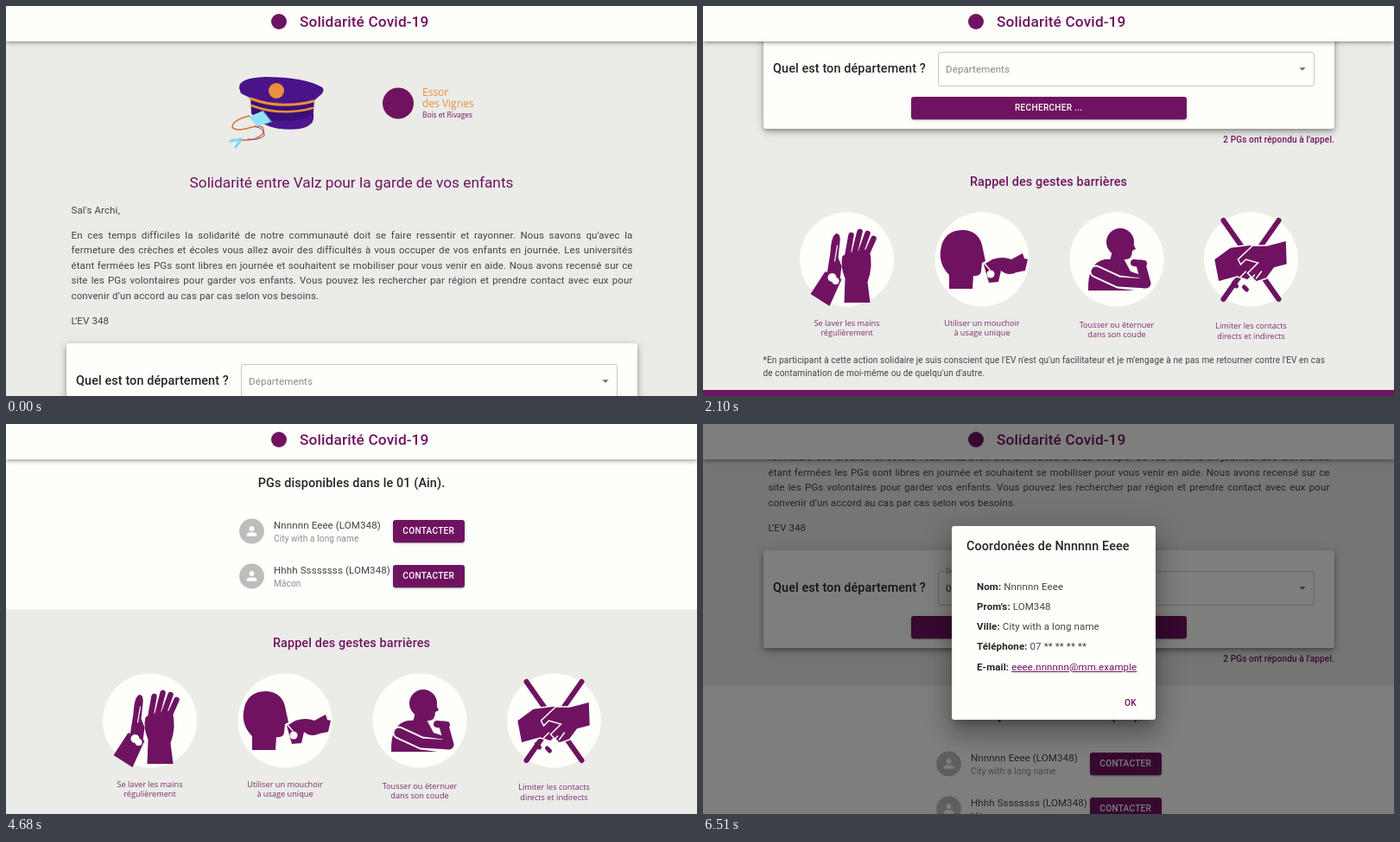
Animation, 800 px wide and 451 px high, one loop 8000 ms. Source, as an HTML page:

```html
<!DOCTYPE html>
<html lang="fr">
<head>
<meta charset="utf-8">
<title>Solidarité Covid-19</title>
<style>
html, body { margin: 0; width: 100%; height: 100%; overflow: hidden; }
body { font-family: Roboto, "Noto Sans", sans-serif; }
#stage { position: relative; width: 800px; height: 451px; overflow: hidden; background: #ebebe8; }
#stage div, #stage svg { position: absolute; box-sizing: border-box; }
#stage svg { left: 0; top: 0; overflow: visible; }
.t { line-height: 20px; height: 20px; white-space: pre; }
.just { width: 650px; white-space: normal !important; text-align: justify; text-align-last: justify; }
.ui { font-family: "Open Sans", "Noto Sans", sans-serif; }
u { text-underline-offset: 1px; }
</style>
</head>
<body>
<div id="stage"></div>
<script>
const PURPLE = '#6f1361', WHITE = '#fefefb', INK = '#434345', DARK = '#252528';
const BODY = 11.52, SMALL = 10.08, H6 = 14.4, H5 = 17.28;
const SPACING = { [BODY]: .00938, [SMALL]: .01071, [H6]: .0075 };
const SHADOW = {
  2: '0 2px 1px -1px #0003, 0 1px 1px #0002, 0 1px 4px #0002',
  4: '0 1.5px 3px -1px #0004, 0 3px 4px #0002, 0 1px 7px #0002',
  6: '0 2px 4px -1px #0004, 0 4px 7px #0003, 0 1px 13px #0002',
  24: '0 8px 11px -5px #0004, 0 17px 27px 2px #0003, 0 6px 33px 6px #0002'
};
const stage = document.getElementById('stage');

function box(parent, x, y, w, h, style = {}) {
  const e = document.createElement('div');
  Object.assign(e.style, { left: x + 'px', top: y + 'px', width: w + 'px', height: h + 'px' }, style);
  parent.append(e);
  return e;
}
// y is the middle of the capitals; align: l, c, r
function text(parent, x, y, size, weight, color, html, align = 'l', cls = '', spacing = SPACING[size] || 0) {
  const left = align === 'c' ? x - 400 : align === 'r' ? x - 800 : x;
  const e = box(parent, left, y - 10, 800, 20, {
    fontSize: size + 'px', fontWeight: weight, color, letterSpacing: spacing + 'em',
    textAlign: { l: 'left', c: 'center', r: 'right' }[align]
  });
  e.className = 't ' + cls;
  if (cls === 'just') e.style.width = '';
  e.innerHTML = html;
  return e;
}
function svg(parent, inner) {
  const holder = box(parent, 0, 0, 1, 1);
  holder.innerHTML = `<svg width="1" height="1">${inner}</svg>`;
}
const dot = (x, y, r, color) => `<circle cx="${x}" cy="${y}" r="${r}" fill="${color}"/>`;
const fill = (d, color = PURPLE) => `<path d="${d}" fill="${color}"/>`;
const line = (d, color, w) =>
  `<path d="${d}" fill="none" stroke="${color}" stroke-width="${w}" stroke-linecap="round" stroke-linejoin="round"/>`;
function button(parent, x, y, w, label) {
  const b = box(parent, x, y, w, 26, { background: PURPLE, borderRadius: '3px', boxShadow: SHADOW[2] });
  text(b, w / 2, 13, SMALL, 500, WHITE, label, 'c', '', .02857);
  return b;
}

const page = box(stage, 0, 0, 800, 1);

// Illustration and association name
svg(page,
  fill('M283 104Q320 118 357 108L355 134Q346 144 318 142Q296 139 284 124Z', '#3b0f79') +
  fill('M284 124Q300 133 320 133Q344 133 356 124Q358 139 340 142Q300 146 284 124Z', '#4c148d') +
  fill('M270 95Q269 83 300 82Q345 82 366 94Q370 98 364 103L356 110Q320 116 284 107L272 101Z', '#4a1389') +
  line('M283 107Q318 120 356 110', '#e8913a', 3) +
  line('M284 115Q318 128 355 118', '#e8913a', 2.5) +
  dot(313, 98, 9, '#e8913a') +
  line('M282 127Q262 132 262 140Q266 146 285 140Q302 136 297 148Q290 156 272 155', '#d9763a', 1.6) +
  line('M288 139Q300 142 299 150Q292 156 280 154', '#8a3a8c', 1) +
  fill('M281 128L298 121L308 134L291 139Z', '#93e3f6') +
  line('M298 122L307 133L302 137', '#2b6ea0', 1) +
  line('M272 154L260 156M271 156L266 163', '#7ed8f4', 3) +
  dot(454, 112.5, 18, PURPLE));
text(page, 482, 100, 12, 400, '#e8913a', 'Essor', 'l', 'ui');
text(page, 482, 113, 12, 400, '#e8913a', 'des Vignes', 'l', 'ui');
text(page, 482, 125.5, 8.4, 400, PURPLE, 'Bois et Rivages', 'l', 'ui');

text(page, 400, 204, H5, 400, PURPLE, 'Solidarité entre Valz pour la garde de vos enfants', 'c');
text(page, 75.5, 236, BODY, 400, INK, "Sal's Archi,");
[
  "En ces temps difficiles la solidarité de notre communauté doit se faire ressentir et rayonner. Nous savons qu'avec la",
  'fermeture des crèches et écoles vous allez avoir des difficultés à vous occuper de vos enfants en journée. Les universités',
  'étant fermées les PGs sont libres en journée et souhaitent se mobiliser pour vous venir en aide. Nous avons recensé sur ce',
  'site les PGs volontaires pour garder vos enfants. Vous pouvez les rechercher par région et prendre contact avec eux pour'
].forEach((s, i) => text(page, 75.5, 265 + i * 17.4, BODY, 400, INK, s, 'l', 'just'));
text(page, 75.5, 334.6, BODY, 400, INK, 'convenir d’un accord au cas par cas selon vos besoins.');
text(page, 75.5, 363.5, BODY, 400, INK, 'L’EV 348');

// Search card
box(page, 70, 390, 661, 113, { background: WHITE, borderRadius: '3px', boxShadow: SHADOW[6] });
text(page, 81, 433.5, H6, 500, DARK, 'Quel est ton département ?');
const field = box(page, 271.5, 413.5, 436.5, 40.5, { borderRadius: '3px' });
const notch = box(page, 278, 412, 0, 4, { background: WHITE });
const label = text(page, 281, 433.5, BODY, 400, '#888', 'Départements');
label.style.transformOrigin = '0 10px';
const value = text(page, 281, 434, BODY, 400, '#37373a', '01 - Ain');
const arrow = box(page, 690.4, 432.2, 7.2, 3.6, { background: '#6b6b6b' });
const search = button(page, 240.5, 465.5, 319.5, 'RECHERCHER ...');
text(page, 731, 516, SMALL, 500, PURPLE, "2 PGs ont répondu à l'appel.", 'r');

// Results
const results = box(page, 0, 547, 800, 180, { background: WHITE });
text(results, 400, 35, H6, 500, DARK, 'PGs disponibles dans le 01 (Ain).', 'c');
const contacts = [['Nnnnnn Eeee', 'City with a long name'], ['Hhhh Ssssssss', 'Mâcon']].map(([name, town], i) => {
  const y = 90 + i * 52;
  svg(results, dot(284.5, y, 14.4, '#bdbdbb') + dot(284.5, y - 3, 2.9, WHITE) +
    fill(`M278.7 ${y + 5.8}v-1.5q0-3 5.8-3t5.8 3v1.5z`, WHITE));
  text(results, 310, y - 7.5, BODY, 400, INK, name + ' (LOM348)');
  text(results, 310, y + 8.5, SMALL, 400, '#8d8d8d', town);
  return button(results, 447.5, y - 13, 83.5, 'CONTACTER');
});

// Advice and footer
const lower = box(page, 0, 0, 800, 1);
text(lower, 400, 565, H6, 500, PURPLE, 'Rappel des gestes barrières', 'c');
const icons = [
  fill('M-3 50L-2 22Q-8 8-5-4L3-8L26-12Q31 8 24 26L27 50Z') +
  line('M0 0L5-28M8-4L15-32M15-5L24-30M22-4L31-24', PURPLE, 6.5) +
  fill('M-42 40L-25 14L-6 23L-20 54Z') +
  fill('M-23 17L-19-8Q-18-28-12-30Q-7-30-8-20L-10-2L-6 8L-8 23Z') +
  dot(-17, 21, 5, WHITE) + dot(-13, 25, 4, WHITE) + line('M-11-16L-14 2', WHITE, 1.2),
  fill('M-38 34L-38 18Q-50 6-48-10Q-45-34-22-34Q-2-33 1-12L4 2L0 4L-1 14Q-2 20-10 19L-11 34Z') +
  fill('M2 6L12 0Q24-4 34 0L47-7L49-1L53 0L50 13L40 15Q30 20 22 13L19 26L8 27Z') +
  dot(10, 17, 4.5, WHITE) + line('M3 5L9 12', WHITE, 1.3),
  dot(4, -20, 16, PURPLE) + fill('M8-34Q20-32 19-18L22-12L18-10Q18 0 10 0L-8 2L-4-14Z') +
  fill('M-33 36Q-34 4-14 0L8-1L16 14L28 18L30 36Z') +
  line('M-24 14L2 26L34 30', WHITE, 15) + line('M-24 14L2 26L34 28L28 6', PURPLE, 11) +
  line('M20 4L31 5', PURPLE, 8),
  line('M-32-45L32 46M32-45L-32 46', PURPLE, 6) +
  `<g stroke="${WHITE}" stroke-width="1.5">` +
  fill('M-43 0L-24-14L0-17L16-8L12 8L-4 24L-16 20L-38 26Z') +
  fill('M41-22L42 6L27 10L18 22L6 26L-4 16L8 4L-6 0L-12 6L-15 0L2-16L18-16Z') + '</g>' +
  line('M-12 20L-6 14M-3 26L4 18M6 22L12 14', WHITE, 1.5) + line('M-20 27L-17 31M-8 32L-5 35', PURPLE, 5)
];
[
  [166.5, 0, 'Se laver les mains', 'régulièrement'],
  [323, 0, 'Utiliser un mouchoir', 'à usage unique'],
  [479, 2, 'Tousser ou éternuer', 'dans son coude'],
  [634.5, 3.5, 'Limiter les contacts', 'directs et indirects']
].forEach(([x, dy, a, b], i) => {
  svg(lower, `<g transform="translate(${x} 654)">${dot(0, 0, 54.5, WHITE)}${icons[i]}</g>`);
  text(lower, x, 727.5 + dy, 9.2, 400, '#7b2d6f', a, 'c', 'ui');
  text(lower, x, 739 + dy, 9.2, 400, '#7b2d6f', b, 'c', 'ui');
});
text(lower, 69.5, 771, SMALL, 400, INK, "*En participant à cette action solidaire je suis conscient que l'EV n'est qu'un facilitateur et je m'engage à ne pas me retourner contre l'EV en cas");
text(lower, 69.5, 785.5, SMALL, 400, INK, "de contamination de moi-même ou de quelqu'un d'autre.");

const footer = box(lower, 0, 805, 800, 198, { background: PURPLE });
svg(footer, dot(400, 33, 12, WHITE));
text(footer, 400, 65, SMALL, 400, WHITE, 'Solidarité Covid-19', 'c');
box(footer, 92, 84, 617, 1, { background: '#eadfe6' });
text(footer, 400, 104, SMALL, 400, WHITE, 'Si tu as des questions, ou un problème, contacte directement:', 'c');
[
  [275.5, "M'lou 31-492 (LOM 348)", '06 39 98 12 34', 'accueil@av.example'],
  [407.5, 'Tani²o 263 (LOM 348)', '06 39 98 56 78', 'vice-tresor@avb.example']
].forEach(([x, name, phone, mail]) => {
  text(footer, x, 130, SMALL, 700, WHITE, name);
  text(footer, x, 144.5, SMALL, 400, WHITE, phone);
  text(footer, x, 159, SMALL, 400, WHITE, `<u>${mail}</u>`);
});
text(footer, 400, 185, SMALL, 400, WHITE, "Usiné par l'EV 348 et <u>(Pom)²ilu 5-294</u> en collaboration avec la <u>RUVE</u>.", 'c');

// App bar
const bar = box(stage, 0, 0, 800, 41, { background: WHITE, boxShadow: SHADOW[4] });
svg(bar, dot(316, 18, 9, PURPLE));
text(bar, 340, 18, H5, 500, PURPLE, 'Solidarité Covid-19', 'l', '', .0075);

// Department list
const menu = box(stage, 271.5, 11.5, 436.5, 428, {
  background: WHITE, borderRadius: '3px', boxShadow: SHADOW[6], overflow: 'hidden', transformOrigin: '50% 70%'
});
const items = ['Ain', 'Aisne', 'Allier', 'Alpes-de-Haute-Provence', 'Hautes-Alpes', 'Alpes-Maritimes', 'Ardèche', 'Ardennes',
  'Ariège', 'Aube', 'Aude', 'Aveyron', 'Bouches-du-Rhône', 'Calvados', 'Cantal', 'Charente'].map((name, i) => {
  const row = box(menu, 0, 5.8 + i * 26, 436.5, 26);
  text(row, 11.5, 13, BODY, 400, '#37373a', String(i + 1).padStart(2, '0') + ' - ' + name);
  return row;
});

// Contact dialog
const shade = box(stage, 0, 0, 800, 451, { background: 'rgba(0,0,0,.5)' });
const dialog = box(shade, 288, 118, 235.5, 223.5, { background: WHITE, borderRadius: '3px', boxShadow: SHADOW[24] });
text(dialog, 17, 23.5, H6, 500, DARK, 'Coordonées de Nnnnnn Eeee');
[
  ['Nom', 'Nnnnnn Eeee'], ["Prom's", 'LOM348'], ['Ville', 'City with a long name'], ['Téléphone', '07 ** ** ** **'],
  ['E-mail', `<u style="color:${PURPLE}">eeee.nnnnnn@mm.example</u>`]
].forEach(([k, v], i) =>
  text(dialog, 29, 69.5 + i * 23.25, BODY, 400, INK, `<b style="color:${DARK}">${k}:</b> ${v}`));
text(dialog, 200, 204.5, SMALL, 500, PURPLE, 'OK', 'l', '', .02857);

// Motion
const clamp = v => Math.max(0, Math.min(1, v));
const part = (t, a, b) => clamp((t - a) / (b - a));
const inOut = p => p * p * (3 - 2 * p);
const out = p => 1 - (1 - p) ** 3;
const mix = (a, b, p) => a + (b - a) * p;
const SCROLLS = [[900, 1560, 552], [1890, 2340, 127], [4260, 4680, 513], [5070, 5550, 244]];
const scrollAt = t => SCROLLS.reduce((y, [a, b, to]) => mix(y, to, inOut(part(t, a, b))), 0);

function hover(b, p) {
  b.style.background = `rgb(${mix(111, 76, p)},${mix(19, 13, p)},${mix(97, 67, p)})`;
  b.style.boxShadow = SHADOW[p > .5 ? 4 : 2];
}

function render(t) {
  const found = t >= 4260;
  const focus = t >= 2880 && t < 4260;
  const open = t >= 2880 && t < 3750;
  const chosen = t >= 3720;
  page.style.transform = `translateY(${-Math.round(scrollAt(t))}px)`;
  results.style.display = found ? '' : 'none';
  lower.style.transform = `translateY(${found ? 202 : 0}px)`;

  const hovered = t >= 2640 && t < 2880;
  field.style.border = focus ? `1.5px solid ${PURPLE}` : `1px solid ${hovered ? '#333' : '#c6c6c4'}`;
  field.style.background = focus && chosen ? '#f3f3f0' : 'none';
  const up = out(part(t, 2860, 3060));
  label.style.transform = `translateY(${-20 * up}px) scale(${1 - .25 * up})`;
  label.style.color = focus && up > .5 ? '#7d3371' : '#888';
  notch.style.width = 62 * up + 'px';
  value.style.display = chosen ? '' : 'none';
  arrow.style.clipPath = open ? 'polygon(0 100%, 50% 0, 100% 100%)' : 'polygon(0 0, 100% 0, 50% 100%)';

  const grow = inOut(part(t, 2880, 3150)), gone = inOut(part(t, 3690, 3930));
  menu.style.opacity = grow * (1 - gone);
  menu.style.transform = `scale(${mix(.75, 1, grow)},${mix(.5625, 1, grow)})`;
  const row = Math.round(mix(11, 0, inOut(part(t, 3120, 3600))));
  items.forEach((e, i) => e.style.background = i === row ? '#ebebe8' : 'none');

  hover(search, inOut(part(t, 4090, 4300)) * (1 - part(t, 5070, 5300)));
  hover(contacts[0], inOut(part(t, 5730, 5910)) * (1 - inOut(part(t, 6210, 6480))));
  shade.style.opacity = inOut(part(t, 6180, 6480));
}

const start = performance.now();
function tick() {
  const t = (performance.now() - start) % 8000;
  render(Math.floor(t / 30) * 30);
  requestAnimationFrame(tick);
}
tick();
</script>
</body>
</html>
```
